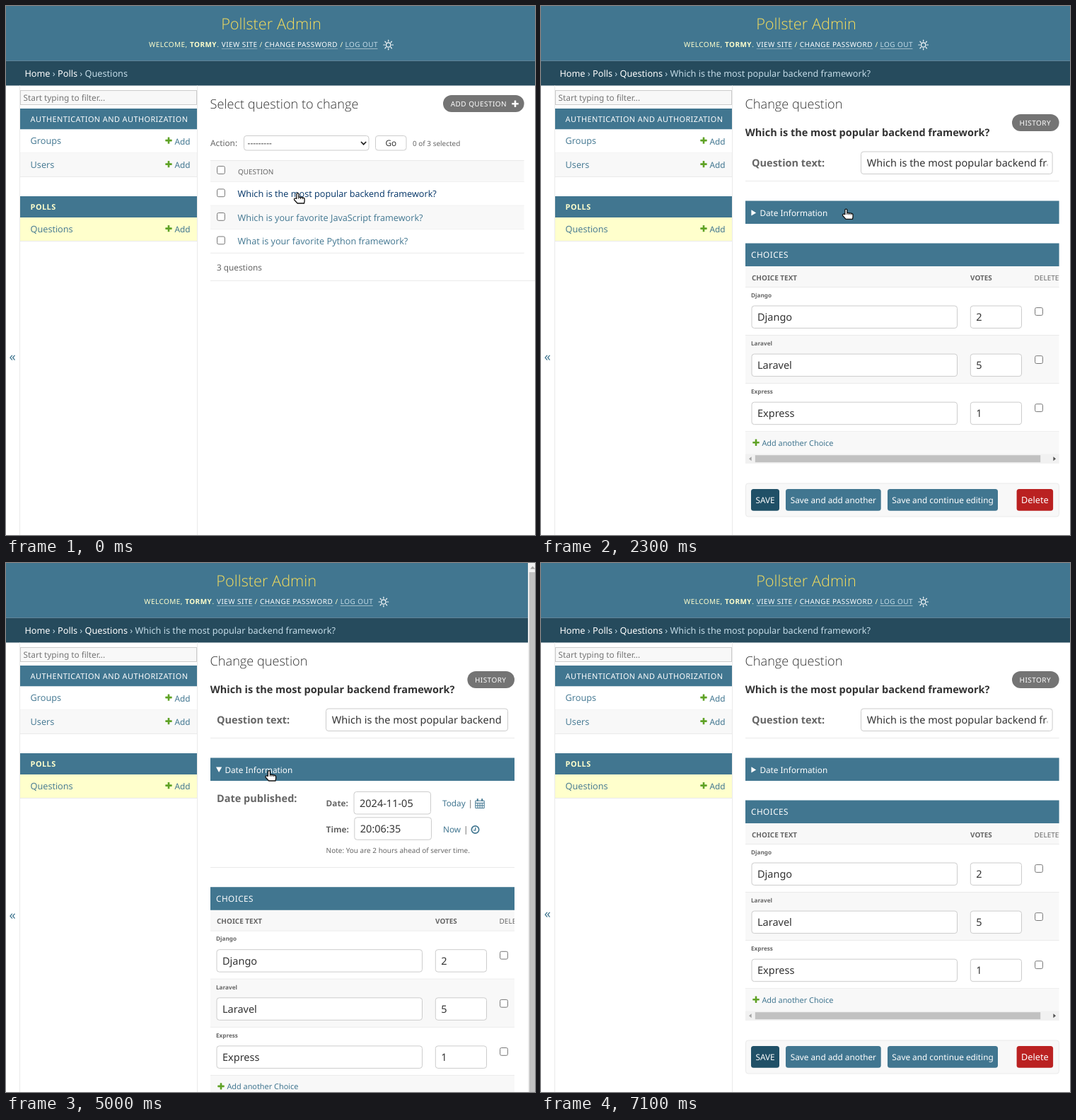
Animation of 748 by 748 pixels, one loop 8 s. Source, as an HTML page:

```html
<!DOCTYPE html>
<html lang="en">
<head>
<meta charset="utf-8">
<title>Poll admin</title>
<style>
  html, body { margin: 0; width: 100%; height: 100%; overflow: hidden; background: #fff; }
  svg { display: block; width: 748px; height: 748px; }
  text { font-family: "Noto Sans", "Open Sans", sans-serif; text-rendering: geometricPrecision; white-space: pre; }
  /* in-between weights */
  text[font-weight="300"], text[font-weight="500"] { font-family: "Open Sans", "Noto Sans", sans-serif; }
</style>
</head>
<body>
<svg id="stage" viewBox="0 0 748 748"></svg>
<script>
const LOOP = 8000, STEP = 100;
const K = 0.907; // page zoom
const BLUE = '#417690', LINE = '#eaeaea', PALE = '#f8f8f8', QUIET = '#666', INK = '#333', CREAM = '#ffc';
const TITLE = 'Which is the most popular backend framework?';

const rect = (x, y, w, h, fill, more = '') =>
  `<rect x="${x}" y="${y}" width="${w}" height="${h}" fill="${fill}" ${more}/>`;
const text = (x, y, s, size, fill = QUIET, weight = 400, more = '') =>
  `<text x="${x}" y="${y}" font-size="${size * K}" fill="${fill}" font-weight="${weight}" ${more}>${s}</text>`;
const path = (d, fill, more = '') => `<path d="${d}" fill="${fill}" ${more}/>`;
const shift = (x, y, s) => `<g transform="translate(${x} ${y})">${s}</g>`;
const SPACED = `letter-spacing="${0.5 * K}"`;
const MIDDLE = 'text-anchor="middle"';

const hline = (x, y, x2) => rect(x, y, x2 - x, 1, LINE);
const box = (x, y, x2, y2, fill = '#fff', stroke = '#ccc') =>
  rect(x + .5, y + .5, x2 - x - 1, y2 - y - 1, fill, `stroke="${stroke}" rx="3.6"`);
const check = (cx, cy) => rect(cx - 5.4, cy - 5.4, 10.8, 10.8, '#fff', 'stroke="#767676" rx="2"');
const plus = (cx, cy, fill = '#5fa225') =>
  rect(cx - 4.7, cy - 1.3, 9.4, 2.6, fill, 'rx=".6"') + rect(cx - 1.3, cy - 4.7, 2.6, 9.4, fill, 'rx=".6"');
const pill = (x, y, x2) => rect(x, y, x2 - x, 24, '#747474', 'rx="12"');

function sun(cx, cy) {
  let rays = '';
  for (let i = 0; i < 8; i++) {
    const c = Math.cos(i * Math.PI / 4), s = Math.sin(i * Math.PI / 4);
    rays += `M${cx + 5 * c} ${cy + 5 * s}L${cx + 6.8 * c} ${cy + 6.8 * s}`;
  }
  return `<circle cx="${cx}" cy="${cy}" r="3.2" fill="none" stroke="#fff" stroke-width="1.2"/>` +
    path(rays, 'none', 'stroke="#fff" stroke-width="1.2" stroke-linecap="round"');
}

function header(dx) {
  const link = (x, s, w, fill = '#fff', alpha = .35) =>
    text(x, 58.4, s, 11, fill, 400, SPACED) + rect(x, 60, w, 1, '#fff', `opacity="${alpha}"`);
  const bits =
    text(375, 32.5, 'Pollster Admin', 24, '#f5dd5d', 300, MIDDLE) +
    text(202, 58.4, 'WELCOME,', 11, CREAM, 400, SPACED) +
    text(260, 58.4, 'TORMY', 11, CREAM, 700, SPACED) +
    text(298.2, 58.4, '.', 11, CREAM) +
    link(304.8, 'VIEW SITE', 50.5) + text(358.5, 58.4, '/', 11, CREAM) +
    link(365.8, 'CHANGE PASSWORD', 103.4) + text(472.4, 58.4, '/', 11, CREAM) +
    link(479.5, 'LOG OUT', 46, '#c4dce8', .5) + sun(540.7, 55);
  return rect(0, 0, 748, 77.7, BLUE) + rect(0, 77.7, 748, 34.8, '#264b5d') + shift(dx, 0, bits);
}

function crumbs(links, last) {
  const s = links.map(l => `<tspan fill="#fff">${l}</tspan> › `).join('') + last;
  return text(26.4, 100, s, 14, '#c4dce8');
}

function sidebar(arrowY) {
  const row = (y, name, bg) =>
    rect(20, y, 250, 33, bg) + hline(20, y + 33, 270) +
    text(34.6, y + 20.8, name, 14, BLUE, 500) + plus(230, y + 15.6) +
    text(238.4, y + 21, 'Add', 13, BLUE);
  return rect(19, 112.5, 1, 636, LINE) + rect(270, 112.5, 1, 636, LINE) +
    text(9, arrowY, '«', 20, BLUE, 400, MIDDLE) +
    rect(20.5, 119.5, 249, 20, PALE, 'stroke="#ccc"') +
    text(24.6, 133.6, 'Start typing to filter...', 13, '#757575') +
    rect(20, 145, 250, 29.5, BLUE) +
    text(34.6, 163.5, 'AUTHENTICATION AND AUTHORIZATION', 12, '#fff', 400, SPACED) +
    row(174.5, 'Groups', '#fff') + row(208, 'Users', PALE) +
    rect(20, 269, 250, 30, BLUE) + text(34.6, 287.8, 'POLLS', 12, CREAM, 700, SPACED) +
    row(299, 'Questions', '#ffc');
}

function listPage() {
  const R = 732.6;
  const row = (y, s, bg, fill, id = '') =>
    rect(289, y, R - 289, 33, bg) + hline(289, y + 33, R) + check(304, y + 15.6) +
    text(327.6, y + 21.2, s, 14, fill, 500, id);
  return header(0) + crumbs(['Home', 'Polls'], 'Questions') + sidebar(502) +
    text(288.6, 145.3, 'Select question to change', 20, INK, 300) +
    pill(618, 126, R) + text(628.8, 142, 'ADD QUESTION', 11, '#fff', 400, SPACED) + plus(720, 138.2, '#fff') +
    text(289, 197.6, 'Action:', 13) + box(336, 183, 513.5, 204.5) +
    text(341.6, 198, '---------', 13, INK) +
    path('M502 192l3.6 3.7 3.6-3.7', 'none', 'stroke="#222" stroke-width="1.7"') +
    box(522, 183, 566.5, 204.5) + text(544.3, 198.4, 'Go', 13, INK, 400, MIDDLE) +
    text(575, 197.6, '0 of 3 selected', 11) +
    hline(289, 218, R) + rect(289, 219, R - 289, 29, PALE) + hline(289, 248, R) +
    check(304, 232) + text(328, 237.8, 'QUESTION', 11) +
    row(248.7, TITLE, '#fff', '#036', 'id="picked"') +
    row(282.3, 'Which is your favorite JavaScript framework?', PALE, BLUE) +
    row(315.8, 'What is your favorite Python framework?', '#fff', BLUE) +
    text(298, 374, '3 questions', 13) + hline(289, 388, 748);
}

function dateFields(R) {
  const calendar =
    path('M.6 3h12.4v10.4H.6zM.6 6.2h12.4M.6 9.8h12.4M3.8 6v7.4M6.9 6v7.4M10 6v7.4', 'none', `stroke="${BLUE}"`) +
    path('M3.6 0v3.6M10 0v3.6', 'none', `stroke="${BLUE}" stroke-width="2"`);
  const clock = `<circle r="5.2" fill="none" stroke="${BLUE}" stroke-width="1.7"/>` +
    path('M.3-3V.8H-2.6', 'none', `stroke="${BLUE}" stroke-width="1.3"`);
  return text(298, 338.2, 'Date published:', 16, QUIET, 700) +
    text(452.6, 344.2, 'Date:', 13, QUIET, 700) + box(491.5, 323, 601, 355.5) +
    text(500, 344.6, '2024-11-05', 16, INK) +
    text(617, 344.4, 'Today', 13, BLUE) + text(653.4, 344.4, '|', 13) + shift(663.2, 333.2, calendar) +
    text(452.6, 381, 'Time:', 13, QUIET, 700) + box(492.3, 359.3, 602, 391.8) +
    text(500.8, 381.2, '20:06:35', 16, INK) +
    text(618, 381, 'Now', 13, BLUE) + text(647, 381, '|', 13) + shift(663.5, 377, clock) +
    text(452.6, 410, 'Note: You are 2 hours ahead of server time.', 11) + hline(289, 430, R);
}

function choices(R, clip) {
  const w = R - 289;
  const row = ([name, votes], i) => shift(0, 68.1 * i,
    rect(289, 398, w, 68, i % 2 ? PALE : '#fff') + hline(289, 465, R) +
    text(297, 411.8, name, 9, QUIET, 700) +
    box(297.5, 423.5, 589, 456) + text(306, 445, name, 16, INK) +
    box(606.8, 423.5, 680, 456) + text(615.2, 445, votes, 16, INK) + check(704, 432));
  const button = (x, x2, s, fill, size = 13) =>
    rect(x, 683, x2 - x, 30.8, fill, 'rx="3.6"') +
    text((x + x2) / 2, 703, s, size, '#fff', 400, MIDDLE);
  return rect(289, 335.5, w, 32.7, BLUE) + text(297, 356.4, 'CHOICES', 13, '#fff', 400, SPACED) +
    rect(289, 368.2, w, 30, PALE) + hline(289, 397, R) +
    text(298, 387.6, 'CHOICE TEXT', 11, QUIET, 700) + text(607, 387.6, 'VOTES', 11, QUIET, 700) +
    text(697.6, 387.6, 'DELETE?', 11, QUIET, 400, `clip-path="url(#${clip})"`) +
    [['Django', 2], ['Laravel', 5], ['Express', 1]].map(row).join('') +
    rect(289, 602.3, w, 31, PALE) + plus(304, 617.2) + text(312.4, 621.6, 'Add another Choice', 12, BLUE) +
    rect(289, 633.4, w, 13.6, '#f1f1f1') + rect(302.8, 635.2, R - 329.2, 10, '#c1c1c1') +
    path('M297.6 637.2v6l-3.6-3z', '#a3a3a3') + path(`M${R - 8.2} 637.2v6l3.6-3z`, '#505050') +
    box(289, 674.5, R + .4, 722.5, PALE, LINE) +
    button(297, 337, 'SAVE', '#205067') + button(346, 480.7, 'Save and add another', BLUE) +
    button(490, 646, 'Save and continue editing', BLUE) + button(R - 60, R - 8.5, 'Delete', '#ba2121', 14);
}

function formPage(open) {
  const R = open ? 719 : 732.6, id = open ? 'open' : 'shut';
  const clip = (name, x) => `<clipPath id="${name}">${rect(0, 0, x, 748, '#000')}</clipPath>`;
  const scrollbar = rect(738, 0, 10, 748, '#f1f1f1') + rect(739.8, 13, 8.2, 735, '#c1c1c1') +
    path('M741.2 8.6h7l-3.5-4z', '#a3a3a3');
  return clip(id + 'Field', R - 16.4) + clip(id + 'Table', R) +
    header(open ? -6.8 : 0) + crumbs(['Home', 'Polls', 'Questions'], TITLE) + sidebar(open ? 504 : 502) +
    text(288.6, 145.3, 'Change question', 20, INK, 300) +
    pill(R - 66.6, 153, R) + text(R - 56, 169, 'HISTORY', 11, '#fff', 400, SPACED) +
    text(288.8, 184.4, TITLE, 16, INK, 700) +
    text(298, 226.6, 'Question text:', 16, QUIET, 700) + box(452, 205.5, R - 9, 238) +
    text(460.8, 227.2, TITLE, 16, INK, 400, `clip-path="url(#${id}Field)"`) +
    hline(289, 247, R) + rect(289, 275.5, R - 289, 32.5, BLUE) +
    path(open ? 'M297 288.6h8.2l-4.1 7.4z' : 'M297.4 288.2v8.4l6.8-4.2z', '#fff') +
    text(309.4, 296.8, 'Date Information', 13, '#fff') +
    (open ? dateFields(R) : '') +
    shift(0, open ? 122.7 : 0, choices(R, id + 'Table')) +
    (open ? scrollbar : '');
}

const pointers = {
  arrow: path('M.4.8V15.4L3.6 12.4 5.9 17.7 8.2 16.7 6 11.6H10.4z', '#fff', 'stroke="#111" stroke-width="1.2"'),
  hand: path('M-1.6 7V1.2A1.5 1.5 0 0 1 1.4 1.2V5L7.4 5.8Q9.6 6.2 9.6 8.4V11L9 14H-.4L-4.8 9.2Q-5.6 7.8-4.2 7-2.8 6.6-1.6 7.4z',
    '#fff', 'stroke="#111" stroke-width="1.3" stroke-linejoin="round"') +
    path('M1.4 5V7.8M4 5.6V8M6.7 6V8.2', 'none', 'stroke="#111"'),
  beam: path('M-3-8.5Q0-8.5 0-7 0-8.5 3-8.5M0-7.5V7.5M-3 8.5Q0 8.5 0 7 0 8.5 3 8.5', 'none', 'stroke="#111" stroke-width="1.2"')
};

// start, end, then a cubic curve as x and y values
const moves = [
  [1700, 2000, [412.5, 415, 424, 428.5], [265, 275, 287, 295]],
  [2200, 3100, [428.5, 455, 555, 560], [295, 218, 218, 309]],
  [3700, 4500, [560, 572, 480, 364], [309, 488, 488, 295]],
  [4800, 5000, [364, 366, 370, 372], [295, 295, 294, 294]],
  [5600, 6300, [372, 400, 500, 546], [294, 330, 420, 420]],
  [6500, 7000, [546, 590, 400, 298], [420, 425, 300, 79]]
];
const cubic = ([a, b, c, d], u) => {
  const v = 1 - u;
  return a * v ** 3 + 3 * b * v * v * u + 3 * c * v * u * u + d * u ** 3;
};

function pointerAt(t) {
  const [t0, t1, xs, ys] = moves.filter(m => t >= m[0]).pop() || moves[0];
  const p = Math.min(1, Math.max(0, (t - t0) / (t1 - t0)));
  const u = p * p * (3 - 2 * p);
  return [cubic(xs, u), cubic(ys, u)];
}

function pointerKind(t, x, y) {
  const inside = (l, top, r, b) => x > l && x < r && y > top && y < b;
  if (t >= 7100) return '';
  if (t < 900 || (t >= 1100 && t < 1600)) return 'hand';
  if (t < 1800) return 'arrow';
  if (inside(289, 275.5, 733, 308)) return 'hand';
  return inside(298, 424, 589, 456) || inside(452, 206, 723, 238) ? 'beam' : 'arrow';
}

const stage = document.getElementById('stage');
const pages = { list: listPage(), shut: formPage(false), open: formPage(true) };
const group = (id, s) => `<g id="${id}">${s}</g>`;
stage.innerHTML = Object.keys(pages).map(k => group('page-' + k, pages[k])).join('') +
  group('pointer', Object.keys(pointers).map(k => group('pointer-' + k, pointers[k])).join(''));
const byId = id => document.getElementById(id);
const show = (prefix, table, key) => {
  for (const k in table) byId(prefix + k).style.display = k === key ? '' : 'none';
};

function draw(now) {
  const t = Math.floor(now % LOOP / STEP) * STEP;
  show('page-', pages, t < 1100 ? 'list' : t >= 4700 && t < 5400 ? 'open' : 'shut');
  byId('picked').setAttribute('text-decoration', t >= 800 ? 'underline' : 'none');
  const [x, y] = pointerAt(t);
  byId('pointer').setAttribute('transform', `translate(${x} ${y})`);
  show('pointer-', pointers, pointerKind(t, x, y));
}

const start = performance.now();
function tick() {
  draw(performance.now() - start);
  requestAnimationFrame(tick);
}
tick();
</script>
</body>
</html>
```
